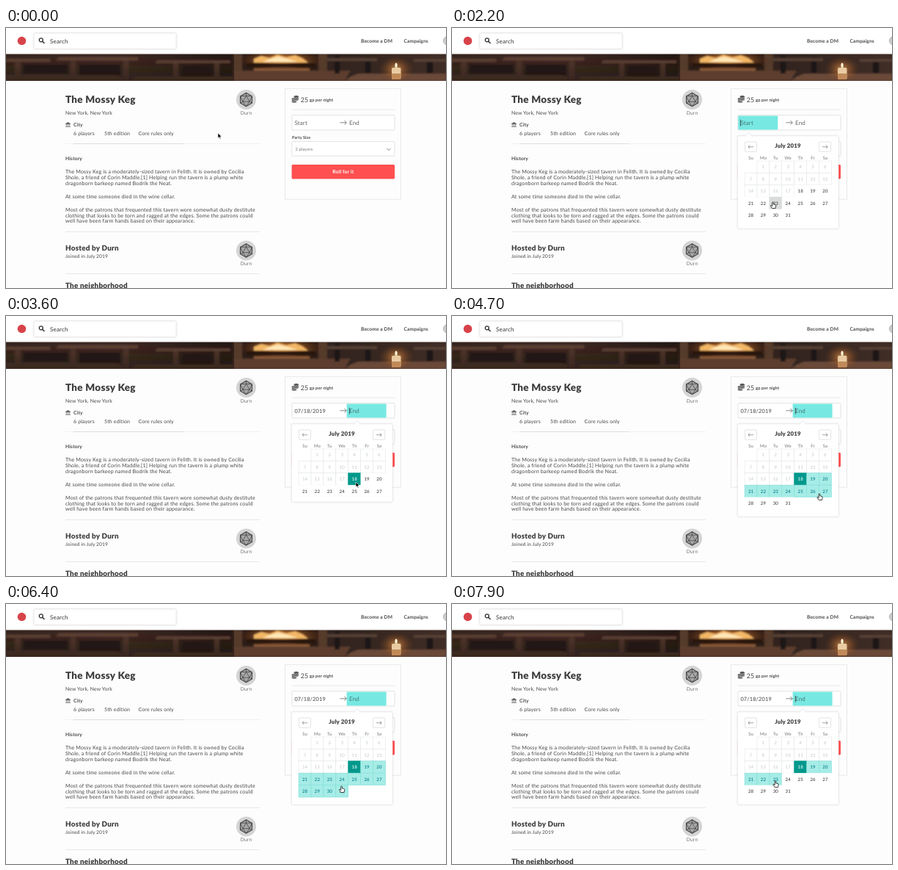
Animation of 600 by 354 pixels, one loop 8000 ms. Source, as an HTML page:

```html
<!DOCTYPE html>
<html lang="en">
<head>
<meta charset="utf-8">
<title>Tavern booking</title>
<style>
  html, body { margin: 0; width: 100%; height: 100%; overflow: hidden; background: #fdfdfd; }
  svg { display: block; width: 600px; height: 354px; }
  text { font-family: Lato, sans-serif; letter-spacing: .02em; text-rendering: geometricPrecision; fill: #484848; }
  .b { font-weight: 700; }
  .h { font-weight: 900; fill: #3d3d3d; }
  .mid { text-anchor: middle; }
  .rule { stroke: #e2e2e2; stroke-width: .8; }
  .box { fill: #fff; stroke: #dcdcdc; stroke-width: .8; }
  .line { fill: none; stroke: #6a6a6a; stroke-width: .8; }
  .soft { filter: drop-shadow(0 .5px 1.2px rgba(0,0,0,.13)); }
</style>
</head>
<body>
<svg viewBox="0 0 600 354">
  <defs>
    <radialGradient id="glow">
      <stop offset="0" stop-color="#ffd08a"/>
      <stop offset=".35" stop-color="#d98238" stop-opacity=".7"/>
      <stop offset="1" stop-color="#7a3c18" stop-opacity="0"/>
    </radialGradient>
    <linearGradient id="wall">
      <stop offset="0" stop-color="#3d2a23"/>
      <stop offset=".25" stop-color="#46302a"/>
      <stop offset=".5" stop-color="#2a1b17"/>
      <stop offset=".78" stop-color="#33241f"/>
      <stop offset="1" stop-color="#3f2d26"/>
    </linearGradient>
    <linearGradient id="shade" x2="0" y2="1">
      <stop offset="0" stop-color="#1d1310" stop-opacity=".1"/>
      <stop offset="1" stop-color="#1d1310" stop-opacity=".55"/>
    </linearGradient>
    <filter id="blur"><feGaussianBlur stdDeviation="1.2"/></filter>
    <clipPath id="heroClip"><path d="M0 35H600V72H0Z"/></clipPath>
    <clipPath id="popClip"><rect id="popCut" x="380" y="140" width="160" height="126"/></clipPath>
    <g id="die">
      <circle r="13.5" fill="#d4d4d4"/>
      <path d="M0-9.2 8-4.6V4.6L0 9.2-8 4.6V-4.6Z" fill="#a9a9a9" stroke="#444" stroke-width="1.1" stroke-linejoin="round"/>
      <path d="M0-5 4.6 2.8H-4.6ZM0-9V-5L8-4.7 4.6 2.8 8 4.7M4.6 2.8 0 9-4.6 2.8-8 4.7M-4.6 2.8-8-4.7 0-5" fill="none" stroke="#444" stroke-width=".8"/>
    </g>
    <path id="arrowR" d="M-4.5 0H4.5M1.5-2.8 4.5 0 1.5 2.8" class="line"/>
  </defs>

  <rect width="600" height="354" fill="#fdfdfd"/>

  <g clip-path="url(#heroClip)">
    <rect y="35" width="600" height="37" fill="url(#wall)"/>
    <g filter="url(#blur)">
      <path d="M0 42H60V46H0ZM72 40H180V44H68ZM206 44H306V48H204Z" fill="#6b4a3b"/>
      <path d="M12 46H20V72H12ZM88 44H95V72H88ZM160 44H167V72H160ZM228 48H235V72H228ZM284 48H291V72H284Z" fill="#5a3d30"/>
      <path d="M24 50H84V62H24ZM100 50H156V64H100ZM240 52H280V66H240Z" fill="#241713"/>
      <path d="M0 64H150L164 72H0ZM176 66H310V72H170Z" fill="#59402f"/>
      <rect y="35" width="310" height="37" fill="url(#shade)"/>
      <rect x="310" y="35" width="128" height="37" fill="#2c1b15"/>
      <path d="M310 35H322V72H310ZM426 35H438V72H426Z" fill="#553a2c"/>
      <ellipse cx="375" cy="44" rx="58" ry="15" fill="url(#glow)"/>
      <path d="M338 47V42L348 38 360 41 370 36 382 40 394 37 404 41 412 47Z" fill="#f3b766"/>
      <path d="M350 46 360 42 371 39 384 42 398 46Z" fill="#ffe8b8"/>
      <path d="M328 48H422V53H328Z" fill="#251510"/>
      <path d="M310 58H470L462 72H310Z" fill="#5b3d2e"/>
      <path d="M338 55H414V58H338Z" fill="#8a5a38"/>
      <path d="M448 38H455V62H448ZM490 40H497V64H490ZM574 42H582V64H574Z" fill="#1f1512"/>
      <path d="M438 41H506V45H438ZM556 42H600V46H556Z" fill="#564036"/>
      <path d="M470 66 480 62H600V72H462Z" fill="#6b4a38"/>
      <ellipse cx="532" cy="56" rx="24" ry="18" fill="url(#glow)" opacity=".65"/>
    </g>
    <path d="M310 35V72" stroke="#1c110d" stroke-width=".8"/>
    <rect x="526" y="54" width="12.5" height="16" rx="2" fill="#e9cba2"/>
    <path d="M526 62H538.5V68Q538.5 70 536.5 70H528Q526 70 526 68Z" fill="#c08a58"/>
    <ellipse cx="532" cy="50.8" rx="1.6" ry="3.4" fill="#fff6d8"/>
  </g>

  <rect width="600" height="35" fill="#fff"/>
  <path d="M0 35.3H600" stroke="#d9d9d9" stroke-width=".7"/>
  <circle cx="21.5" cy="17.5" r="5.8" fill="#d8434a"/>
  <rect x="38" y="7" width="194" height="21.5" rx="1.5" fill="#fff" stroke="#e3e3e3" stroke-width=".7" class="soft"/>
  <circle cx="47.8" cy="16.3" r="2.5" fill="none" stroke="#333" stroke-width="1.3"/>
  <path d="M49.7 18.2 52 20.5" stroke="#333" stroke-width="1.6" stroke-linecap="round"/>
  <text x="60" y="20.6" font-size="8" font-weight="500">Search</text>
  <text x="484" y="20.3" font-size="6.6" class="b">Become a DM</text>
  <text x="542.5" y="20.3" font-size="6.6" class="b">Campaigns</text>
  <circle cx="602" cy="17.3" r="5.6" fill="#cfcfcf" stroke="#8b8b8b" stroke-width=".6"/>

  <text x="81" y="102.4" font-size="13.5" class="h">The Mossy Keg</text>
  <text x="81" y="118" font-size="6.9">New York, New York</text>
  <path d="M81.3 130.6 84.5 128.6 87.7 130.6ZM82.3 131.2V133.6M84.5 131.2V133.6M86.7 131.2V133.6M81.2 134.3H87.8" fill="#555" stroke="#555" stroke-width=".8"/>
  <text x="92" y="134.4" font-size="6.7" class="b">City</text>
  <g font-size="7">
    <text x="92" y="145.7">6 players</text>
    <text x="134" y="145.7">5th edition</text>
    <text x="180.5" y="145.7">Core rules only</text>
  </g>
  <path class="rule" d="M81 277.4H346M81 334.6H346"/>
  <path class="rule" d="M81 157.6H346" style="stroke:#ececec"/>
  <path class="rule" d="M92 157.6H242" style="stroke:#d8d8d8"/>
  <text x="81" y="179.8" font-size="6.7" class="b">History</text>
  <g font-size="7.13">
    <text x="81" y="198">The Mossy Keg is a moderately-sized tavern in Felith. It is owned by Cecilia</text>
    <text x="81" y="205.9">Shole, a friend of Corin Maddle.[1] Helping run the tavern is a plump white</text>
    <text x="81" y="213.7">dragonborn barkeep named Bodrik the Neat.</text>
    <text x="81" y="231.7">At some time someone died in the wine cellar.</text>
    <text x="81" y="249.7">Most of the patrons that frequented this tavern wore somewhat dusty destitute</text>
    <text x="81" y="257.5">clothing that looks to be torn and ragged at the edges. Some the patrons could</text>
    <text x="81" y="265.3">well have been farm hands based on their appearance.</text>
  </g>
  <text x="81" y="302.8" font-size="9.9" class="h">Hosted by Durn</text>
  <text x="81" y="312.6" font-size="6.6">Joined in July 2019</text>
  <text x="81" y="353.7" font-size="9.9" class="h">The neighborhood</text>
  <use href="#die" x="327.5" y="97.5"/>
  <use href="#die" x="327.5" y="303"/>
  <text x="327.5" y="117.6" font-size="6.8" class="mid" style="fill:#777">Durn</text>
  <text x="327.5" y="323.2" font-size="6.8" class="mid" style="fill:#777">Durn</text>

  <rect x="380.5" y="82.7" width="158" height="150.5" fill="#fdfdfd" stroke="#e4e4e4" stroke-width=".8"/>
  <g fill="#4a4a4a" stroke="#fdfdfd" stroke-width=".5">
    <ellipse cx="393" cy="100.2" rx="3.4" ry="1.7"/><ellipse cx="393" cy="98.3" rx="3.4" ry="1.7"/>
    <ellipse cx="393" cy="96.4" rx="3.4" ry="1.7"/><ellipse cx="395.8" cy="97.3" rx="3.4" ry="1.7"/>
    <ellipse cx="395.8" cy="95.4" rx="3.4" ry="1.7"/><ellipse cx="395.8" cy="93.5" rx="3.4" ry="1.7"/>
  </g>
  <text x="401.7" y="100.6" font-size="9">25</text>
  <text x="414" y="99.8" font-size="5.8" class="b">gp per night</text>
  <path class="rule" d="M390 111.3H530"/>
  <rect class="box" x="389.9" y="118.6" width="140" height="20.4" rx="1"/>
  <rect id="focus" x="390.3" y="119.6" width="54" height="18.8" rx="1" fill="#78e8e2"/>
  <text id="from" x="393.4" y="132.3">Start</text>
  <use href="#arrowR" x="459.8" y="128.8"/>
  <text id="to" x="468" y="132.3" font-size="8">End</text>
  <path id="caret" d="M0 124.7V133.7" stroke="#222" stroke-width=".7"/>
  <text x="390" y="151" font-size="5.5" class="b">Party Size</text>
  <rect class="box" x="389.9" y="154.6" width="140" height="19.6" rx="1.5"/>
  <text x="394.5" y="166.5" font-size="5.8" style="fill:#777">2 players</text>
  <path class="line" d="M519.2 163.8 521.9 166.6 524.6 163.8"/>
  <rect x="389.6" y="186" width="140.4" height="19.6" rx="1.5" fill="#ff4f50"/>
  <text x="459.8" y="198.4" font-size="6.8" class="b mid" style="fill:#fff">Roll for it</text>

  <g id="popup">
    <rect id="panel" class="soft" x="389.5" y="147" width="137.5" height="126" rx="1.5" fill="#fff" stroke="#e4e4e4" stroke-width=".5"/>
    <path id="tip" d="M-5 147.4 0 142.6 5 147.4" fill="#fff" stroke="#dcdcdc" stroke-width=".6"/>
    <g id="sheet" clip-path="url(#popClip)">
      <rect class="box" x="399.5" y="155" width="16" height="13.4" rx="1"/>
      <rect class="box" x="500.6" y="155" width="16" height="13.4" rx="1"/>
      <use href="#arrowR" transform="translate(407.5 161.8) scale(-.8 .8)"/>
      <use href="#arrowR" transform="translate(508.6 161.8) scale(.8)"/>
      <text x="458" y="163.2" font-size="7.9" class="h mid">July 2019</text>
    </g>
  </g>
  <g id="cursor" stroke-linejoin="round">
    <path id="arrow" d="M0 0V7L1.6 5.6 2.7 8.1 3.9 7.6 2.8 5.1H5Z" fill="#000" stroke="#fff" stroke-width=".6"/>
    <path id="beam" d="M-1.4-3.1Q0-3.1 0-2.4Q0-3.1 1.4-3.1M0-2.4V2.4M-1.4 3.1Q0 3.1 0 2.4Q0 3.1 1.4 3.1" fill="none" stroke="#222" stroke-width=".7"/>
    <path id="hand" d="M-.8.4Q0-.5.8.4V3L3 3.4Q4.4 3.8 4.2 5.4L3.5 8.6H-.8L-3 5.4Q-3.2 4.2-2 4.5L-.8 5.6Z" fill="#fff" stroke="#111" stroke-width=".8"/>
  </g>
</svg>
<script>
const $ = id => document.getElementById(id);
const LOOP = 8000, OPEN = 1100, PICK = 3500, GROW = 200;
const LEFT = 399.1, TOP = 181, W = 16.9, H = 16.4, FIRST = 18;

function add(tag, attrs, label) {
  const el = document.createElementNS('http://www.w3.org/2000/svg', tag);
  for (const k in attrs) el.setAttribute(k, attrs[k]);
  if (label !== undefined) el.textContent = label;
  $('sheet').append(el);
  return el;
}
const set = (id, attrs) => { for (const k in attrs) $(id).setAttribute(k, attrs[k]); };
const show = (id, on) => { $(id).style.display = on ? '' : 'none'; };

['Su', 'Mo', 'Tu', 'We', 'Th', 'Fr', 'Sa'].forEach((name, i) => {
  add('text', { x: LEFT + (i + .5) * W, y: 179.3, 'font-size': 6, class: 'mid', style: 'fill:#757575' }, name);
});

// July 2019 starts on a Monday
const days = [];
for (let n = 1; n <= 31; n++) {
  const x = LEFT + n % 7 * W, y = TOP + Math.floor(n / 7) * H;
  const cell = add('rect', { x, y, width: W, height: H, 'stroke-width': .6 });
  const num = add('text', { x: x + W / 2, y: y + H / 2 + 2.2, 'font-size': 6.1, class: 'mid' }, n);
  num.style.fontWeight = n < FIRST ? 400 : 500;
  days.push({ n, cell, num });
}

// time, x, y of the pointer
const path = [
  [150, 289, 143], [900, 423, 129], [1350, 423, 129], [1800, 441, 192],
  [2200, 437.5, 237], [2450, 437.5, 237], [2850, 471, 220], [3150, 477, 226],
  [3700, 477, 226], [4200, 494, 223], [4650, 501, 242], [4850, 501, 242],
  [5400, 424, 253], [5900, 441, 251], [6350, 457.5, 248], [6600, 457.5, 248],
  [7000, 457, 239], [7400, 425, 238], [7850, 441, 241], [8000, 441, 241]
];
function pointer(t) {
  const i = path.findIndex(p => p[0] > t);
  if (i < 1) return path[0].slice(1);
  const [a, b] = [path[i - 1], path[i]];
  const u = (t - a[0]) / (b[0] - a[0]), e = u * u * (3 - 2 * u);
  return [a[1] + (b[1] - a[1]) * e, a[2] + (b[2] - a[2]) * e];
}

function dayAt(x, y) {
  const c = Math.floor((x - LEFT) / W), r = Math.floor((y - TOP) / H);
  const n = r * 7 + c;
  return c >= 0 && c < 7 && r >= 0 && n >= FIRST && n <= 31 ? n : 0;
}

function look(n, hover, picked) {
  if (n < FIRST) return ['#fff', '#e4e7e7', '#c3c6c6'];
  if (picked && n === FIRST) return ['#00998c', '#00998c', '#fff'];
  if (picked && n <= hover) return ['#a6ece6', '#80dfd8', '#007a87'];
  if (n === hover) return ['#dadcdc', '#d2d4d4', '#3d3d3d'];
  return ['#fff', 'none', '#3d3d3d'];
}

function draw(t) {
  const open = t >= OPEN, picked = t >= PICK;
  const since = t - (picked ? PICK : OPEN);
  const growing = open && since < GROW;
  const [x, y] = pointer(t);
  const hover = open && !growing ? dayAt(x, y) : 0;

  show('popup', open);
  show('focus', open);
  show('caret', open && since % 1000 < 500);
  const height = 86 + 40 * Math.min(1, Math.max(0, since / GROW));
  set('panel', { height });
  set('popCut', { height });
  set('tip', { transform: `translate(${picked ? 478.5 : 404.5} 0)` });
  set('focus', { x: picked ? 464.6 : 390.3 });
  set('caret', { transform: `translate(${picked ? 468.3 : 393.4} 0)` });
  $('from').textContent = picked ? '07/18/2019' : 'Start';
  set('from', { 'font-size': picked ? 7.4 : 8 });
  $('from').style.fill = open && !picked ? '#467a78' : picked ? '#404040' : '#666';
  $('to').style.fill = picked ? '#467a78' : '#666';

  for (const { n, cell, num } of days) {
    const [fill, edge, ink] = look(n, hover, picked);
    cell.setAttribute('fill', fill);
    cell.setAttribute('stroke', edge);
    num.style.fill = ink;
  }

  const field = x > 390 && x < 530 && y > 118 && y < 139;
  show('beam', field);
  show('hand', !field && hover);
  show('arrow', !field && !hover);
  set('cursor', { transform: `translate(${x} ${y})` });
}

function tick(now) {
  draw(now % LOOP);
  requestAnimationFrame(tick);
}
draw(0);
requestAnimationFrame(tick);
</script>
</body>
</html>
```
